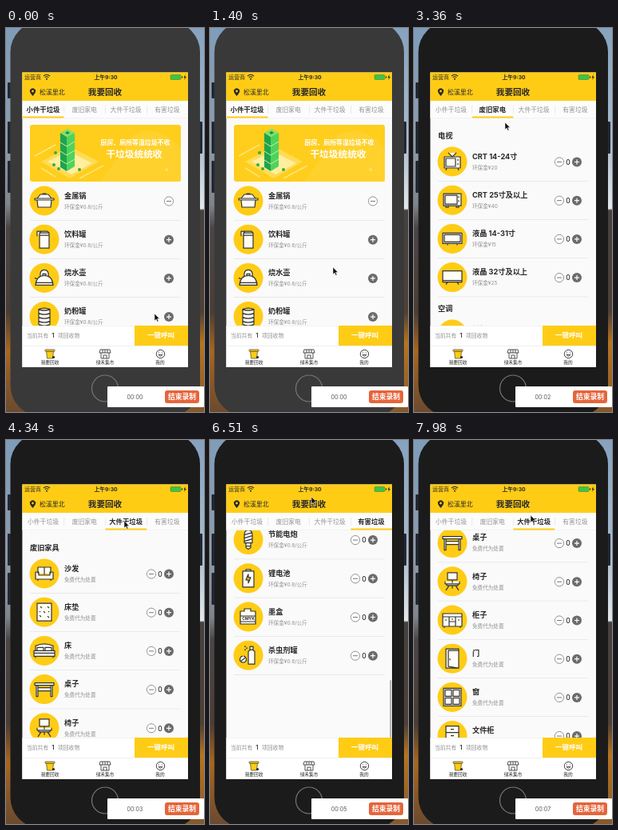
Recreate the animation shown at these times as an HTML page. Size 248 by 480 pixels, loop 8000 ms.

```html
<!DOCTYPE html>
<html lang="zh-CN">
<head>
<meta charset="utf-8">
<style>
  html, body { margin: 0; width: 100%; height: 100%; overflow: hidden; }
  svg { display: block; }
  #stage { width: 248px; height: 480px; font-family: Inter, 'Noto Sans CJK SC', 'Noto Sans CJK', sans-serif; }
  .icon { fill: #fffdf5; stroke: #333; stroke-width: 1.2; stroke-linejoin: round; }
</style>
</head>
<body>
<svg id="stage" viewBox="0 0 248 480"></svg>
<script>
const YELLOW = '#ffcc15', INK = '#292929', GREY = '#929292';
const PITCH = 48.2, LIST_TOP = 113, LIST_HEIGHT = 259;

// Text is centred vertically on y.
const text = (x, y, size, str, fill = INK, weight = 400, anchor = 'start', id = '') =>
  `<text ${id && `id="${id}"`} x="${x}" y="${y + size * .38}" font-size="${size}" fill="${fill}" font-weight="${weight}" text-anchor="${anchor}">${str}</text>`;
const rect = (x, y, w, h, fill, r = 0, more = '') =>
  `<rect x="${x}" y="${y}" width="${w}" height="${h}" rx="${r}" fill="${fill}" ${more}/>`;
const circle = (x, y, r, fill, more = '') => `<circle cx="${x}" cy="${y}" r="${r}" fill="${fill}" ${more}/>`;
const path = (d, fill = 'none', more = '') => `<path d="${d}" fill="${fill}" ${more}/>`;

const icons = {
  pot: 'M-9-1H9L8 8H-8ZM-12-3H12V-1H-12ZM-9-3L-5-8H5L9-3M-2-8V-9H2V-8',
  can: 'M-6-8H6V11H-6ZM-6-8L-4-10H4L6-8M-9-4V-10H-4M-6-5H6',
  kettle: 'M-11 9Q-10-3 0-3T11 9ZM-11 6H11M-5-2Q-6-10 0-10T5-2M-8 2L-12 0M-2-3V-5H2V-3',
  tin: 'M-7-9V10Q0 13 7 10V-9Q0-6-7-9Q0-12 7-9M-7-4Q0-1 7-4M-7 1Q0 4 7 1M-7 6Q0 9 7 6',
  tv: 'M-10-6H10V8H-10ZM-8-4H4V6H-8ZM-5-11L0-6L5-11M7-3V-1M7 2V4M-7 8L-8 11M7 8L8 11',
  bigTv: 'M-11-8H11V7H-11ZM-9-6H6V5H-9ZM8-5V-3M8 0V2M-8 7V9H-5V7M5 7V9H8V7',
  lcd: 'M-12-7H12V6H-12ZM-10-5H10V4H-10ZM-6 6V8M6 6V8',
  wideLcd: 'M-12-8H12V6H-12ZM-12 4H12M-6 6L-8 9M6 6L8 9',
  cooler: 'M-12-6H12V5H-12ZM-9 2H9M6-3H9',
  sofa: 'M-8 0V-8H8V0M0-8V1M-11-2H-7V2H7V-2H11V7H-11ZM-8 7V9M8 7V9',
  mattress: 'M-9-11H9V11H-9ZM-5-7L-3-5M4-7L6-5M-1-1L1 1M-6 4L-4 6M4 5L6 7M-6-1L-5 0M5-1L6 0',
  bed: 'M-11 0V-6Q0-11 11-6V0M-9 0V-4H-1V0M1 0V-4H9V0M-13 0H13V7H-13ZM-13 3H13M-11 7V9M11 7V9',
  desk: 'M-12-8H12V-5H-12ZM-10-5V9H-8V-5M8-5V9H10V-5M-8-2H8V2H-8Z',
  chair: 'M-6-11H6V-2H-6ZM0-2V2M-9 0V3H9V0M-7 3H7V5H-7ZM-4 5L-8 11M4 5L8 11M0 5V9',
  cabinet: 'M-12-8H12V8H-12ZM-12-4H12M-4-4V8M4-4V8M-4 2H4M-9 0H-7M-1-1H1M7 0H9M-10 8V10M10 8V10',
  door: 'M-8-12H8V12H-8ZM-5-10H8V12L-5 10ZM-3 0V2',
  window: 'M-11-11H11V11H-11ZM-9-9H-1V-1H-9ZM1-9H9V-1H1ZM-9 1H-1V9H-9ZM1 1H9V9H1Z',
  files: 'M-8-12H8V12H-8ZM-8-4H8M-8 4H8M-2-8H2M-2 0H2M-2 8H2',
  tube: 'M-10 6L6-10L10-6L-6 10ZM-7 3L-3 7M3-7L7-3',
  gauge: 'M-3-11H3V3Q6 7 0 10Q-6 7-3 3ZM0-6V6M3-6H6M3-2H6',
  pill: 'M-9 3L3-9Q10-9 9-3L-3 9Q-10 9-9 3ZM-3-3L3 3',
  bulb: 'M-5-6Q-5-12 0-12T5-6V4H-5ZM-5-6L5-9M-5-2L5-5M-5 2L5-1M-3 4V10L0 12L3 10V4M-3 8H3',
  battery: 'M-7-9H7V11H-7ZM-3-11H3V-9H-3ZM0-5L-3 2H0V6L3-1H0Z',
  ink: 'M-10-7H-5V-10H3V-7H9V9H-10ZM-10-1H9M-10 6H9',
  spray: 'M0-5Q4-9 8-5V11H0ZM2-7V-11H6V-7M-7 1A4 4 0 1 0-6 1M-9 7L-4 3M-3-9H-1M-5-11H-3M-5-7H-3'
};

const button = (x, y, plus) => plus
  ? circle(x, y, 6, '#6b6b6b') + path(`M${x - 3} ${y}h6m-3-3v6`, 'none', 'stroke="#fff" stroke-width="1.2"')
  : circle(x, y, 5.6, '#fff', 'stroke="#888" stroke-width=".9"') + path(`M${x - 3} ${y}h6`, 'none', 'stroke="#777"');

function row(y, [icon, name, note], controls) {
  return circle(48, y, 18.5, YELLOW)
    + `<g transform="translate(48 ${y})">${path(icons[icon], '#fffdf5', 'class="icon"')}`
    + (icon === 'ink' ? text(0, 2.5, 5, 'CMYK', INK, 700, 'middle') : '') + '</g>'
    + text(73, y - 6.6, 9.2, name, INK, 700) + text(73, y + 7.3, 6.6, note, GREY)
    + rect(30, y + 24, 188, .6, '#dedede') + controls(y + .5);
}
const counter = y => button(182, y, false) + text(193, y, 8.5, '0', INK, 500, 'middle') + button(204, y, true);

function section(y, title, rows) {
  return text(30, y, 9.2, title, INK, 700) + rows.map((r, i) => row(y + 32 + i * PITCH, r, counter)).join('');
}

const perKilo = '环保金¥0.8/公斤', free = '免费代为处置';
const withNote = (note, items) => items.map(item => [...item, note]);

const banner = rect(30, 121, 189, 71, '#ffcd1c', 3)
  + path('M118 192L160 134Q190 118 219 150V192Z', '#ffd53c', 'opacity=".5"')
  + path('M44 167L80 148L116 167L80 188Z', '#ffdc55') + path('M52 167L78 154L108 169L82 183Z', '#ffef9f')
  + path('M36 160L62 146M92 188L122 172M44 175L62 186', 'none', 'stroke="#ffe47a" stroke-width="1.5"')
  + path('M68 131L76 136V179L68 174Z', '#1fa34c') + path('M76 136L86 131V173L76 179Z', '#4fd35c')
  + path('M68 131L77 126L86 131L76 136Z', '#7be36d') + path('M74 131L77 129L80 131L77 133Z', '#258a42')
  + [143, 154, 165].map(y => path(`M68 ${y}l8 5l10-6`, 'none', 'stroke="#c4f0a0"')).join('')
  + [[62, 156], [60, 171], [66, 176], [92, 177]].map(([x, y]) => circle(x, y, 2, '#3aa948')).join('')
  + path('M199 175l4 4m0-4l-4 4', 'none', 'stroke="#ffe78a"')
  + text(162, 143, 7.9, '厨房、厕所等湿垃圾不收', '#fff', 700, 'middle')
  + text(160.5, 158, 11.7, '干垃圾统统收', '#fff', 700, 'middle');

const pages = [
  banner + withNote(perKilo, [['pot', '金属锅'], ['can', '饮料罐'], ['kettle', '烧水壶'], ['tin', '奶粉罐']])
    .map((r, i) => row(216 + i * PITCH, r, y => button(204, y, i > 0))).join(''),
  section(135, '电视', [['tv', 'CRT 14-24寸', '环保金¥20'], ['bigTv', 'CRT 25寸及以上', '环保金¥40'],
    ['lcd', '液晶 14-31寸', '环保金¥15'], ['wideLcd', '液晶 32寸及以上', '环保金¥25']])
    + section(351, '空调', [['cooler', '挂机', '环保金¥60']]),
  section(135, '废旧家具', withNote(free, [['sofa', '沙发'], ['mattress', '床垫'], ['bed', '床'], ['desk', '桌子'],
    ['chair', '椅子'], ['cabinet', '柜子'], ['door', '门'], ['window', '窗'], ['files', '文件柜']])),
  section(135, '有害垃圾', withNote(perKilo, [['tube', '灯管'], ['gauge', '温度计'], ['pill', '过期药品'],
    ['bulb', '节能电炮'], ['battery', '锂电池'], ['ink', '墨盒'], ['spray', '杀虫剂罐']]))
];
const tabNames = ['小件干垃圾', '废旧家电', '大件干垃圾', '有害垃圾'];
const tabCentre = i => 46.5 + i * 51.8;

const backdrop = `<defs>
  <linearGradient id="west" x2="0" y2="1">
    <stop stop-color="#7f9dba"/><stop offset=".3" stop-color="#8c9cad"/><stop offset=".46" stop-color="#80858c"/>
    <stop offset=".52" stop-color="#4a4646"/><stop offset=".74" stop-color="#4c3d34"/>
    <stop offset=".84" stop-color="#a8661f"/><stop offset="1" stop-color="#6b4a30"/>
  </linearGradient>
  <linearGradient id="east" x2="0" y2="1">
    <stop stop-color="#86a2be"/><stop offset=".3" stop-color="#a9bccd"/><stop offset=".47" stop-color="#e3e8ec"/>
    <stop offset=".475" stop-color="#45413f"/><stop offset=".74" stop-color="#4f4036"/>
    <stop offset=".82" stop-color="#b8741f"/><stop offset="1" stop-color="#85592c"/>
  </linearGradient>
</defs>` + rect(0, 0, 124, 480, 'url(#west)') + rect(124, 0, 124, 480, 'url(#east)');

const phone = [[2, 68, 20], [2, 117, 40], [2, 166, 40], [242, 117, 40]].map(([x, y, h]) => rect(x, y, 4, h, '#222833', 1)).join('')
  + rect(5.5, -8, 237.5, 493, '#1b1b1c', 38, 'id="body"')
  + circle(124, 450.5, 16.5, 'none', 'stroke="#77777a" stroke-width="1.2"');

const list = rect(20.4, 55.5, 207.6, 368.5, '#fafafa')
  + `<svg x="21" y="${LIST_TOP}" width="207" height="${LIST_HEIGHT}" viewBox="21 ${LIST_TOP} 207 ${LIST_HEIGHT}"><g id="scroller">`
  + pages.map(p => `<g class="page">${p}</g>`).join('') + '</g>'
  + rect(225.3, 0, 1.8, 72, '#aaa', 1, 'id="bar"') + '</svg>';

const header = rect(20.4, 55.5, 207.6, 35.5, YELLOW)
  + text(23, 61.5, 7, '运营商')
  + path('M47 60Q51 56.5 55 60M48.7 61.8Q51 59.8 53.3 61.8', 'none', `stroke="${INK}" stroke-width="1.1"`) + circle(51, 63.7, 1, INK)
  + text(125, 61.5, 6.8, '上午9:30', INK, 700, 'middle')
  + rect(206, 58.5, 13, 6, '#35c84b', 1.3, 'stroke="#6c7a25" stroke-width=".6"') + rect(220, 60.3, 1, 2.4, INK)
  + path('M224.5 58L222.5 62H224L223 65L226 61H224.3Z', INK)
  + path('M33.5 85Q29 80 30 77.5Q33.5 73 37 77.5Q38 80 33.5 85Z', INK) + circle(33.5, 79, 1.4, YELLOW)
  + text(42, 80, 7.9, '松溪里北') + text(124, 80, 10.6, '我要回收', INK, 700, 'middle')
  + rect(20.4, 91, 207.6, 22, '#fcfcfc') + rect(20.4, 112.5, 207.6, .5, '#e8e8e8')
  + [1, 2, 3].map(i => rect(20.7 + i * 51.8, 97, .6, 10, '#ddd')).join('')
  + rect(0, 110.5, 51.5, 2, YELLOW, 0, 'id="underline"')
  + tabNames.map((name, i) => text(tabCentre(i), 102, 7.8, name, GREY, 400, 'middle', 'tab' + i)).join('');

const footer = rect(20.4, 372, 207.6, 52, '#fff') + rect(20.4, 372, 140, .5, '#e4e4e4')
  + text(26, 384, 6.8, '当前共有', GREY) + text(59, 384, 8, '1', INK, 500, 'middle') + text(65, 384, 6.8, '项回收物', GREY)
  + rect(161, 372, 67, 25, YELLOW) + text(194, 384, 8.5, '一键呼叫', '#fff', 700, 'middle')
  + rect(20.4, 397, 207.6, .5, '#ddd')
  + path('M50.5 404H59.5L58.5 413H51.5Z', YELLOW, `stroke="${INK}" stroke-width=".6"`)
  + rect(49, 402, 12, 2.2, YELLOW, .5, `stroke="${INK}" stroke-width=".6"`) + circle(59.5, 411.5, 1.6, INK)
  + path('M118 402H130L131 406H117ZM119 406V413H129V406M122 413V409H126V413M121 402V406M124 402V406M127 402V406', 'none', `stroke="${INK}" stroke-width=".8"`)
  + circle(193.5, 407.5, 5.2, 'none', `stroke="${INK}" stroke-width=".9"`)
  + path('M191.5 405.5v1M195.5 405.5v1M191 408.5H196Q193.5 412 191 408.5', 'none', `stroke="${INK}" stroke-width=".8"`)
  + ['我要回收', '绿禾集市', '我的'].map((s, i) => text(55 + i * 69, 417.5, 5.7, s, INK, 500, 'middle')).join('');

const recorder = rect(127, 448, 121, 26, '#fff', 1)
  + text(161.5, 461, 7.1, '00:00', '#555', 400, 'middle', 'clock')
  + rect(199, 453, 43, 16, '#e5653b', 3) + text(220.5, 461, 8.8, '结束录制', '#fff', 700, 'middle');

const cursor = path('M0 0V9L2.1 7.1L3.6 10.3L5 9.7L3.6 6.5H6.3Z', '#111', 'id="cursor" stroke="#fff" stroke-width=".5"');

document.getElementById('stage').innerHTML = backdrop + phone + list + header + footer + recorder + cursor;

const $ = id => document.getElementById(id);
const pageGroups = document.querySelectorAll('.page');

// Pointer path: time, x, y
const route = [[0, 186, 357], [700, 186, 357], [1400, 154, 299], [2240, 178, 107], [2660, 102, 101], [2900, 102, 101],
  [3360, 114, 118], [3900, 148, 101], [4500, 148, 101], [5150, 200, 101], [5600, 200, 101], [6080, 127, 258],
  [6510, 127, 71], [6700, 127, 71], [7300, 146, 94], [8000, 146, 94]];
// Tab changes, latest first: time, tab
const switches = [[7500, 2], [5500, 3], [4250, 2], [2730, 1], [0, 0]];
const DRAG_START = 6080, DRAG_END = 6620;

function pointer(t) {
  const i = route.findIndex(p => p[0] > t);
  const [t0, x0, y0] = route[i - 1], [t1, x1, y1] = route[i];
  const k = (t - t0) / (t1 - t0), e = k * k * (3 - 2 * k);
  return [x0 + (x1 - x0) * e, y0 + (y1 - y0) * e];
}

function scrollAt(t, y) {
  if (t < DRAG_START) return 0;
  return t < DRAG_END ? 258 - y : 183 + 4 * Math.exp((DRAG_END - t) / 90);
}

function draw(now) {
  const t = Math.floor(now % 8000 / 70) * 70;
  const active = switches.find(s => t >= s[0])[1];
  const [x, y] = pointer(t), scroll = scrollAt(t, y);

  pageGroups.forEach((g, i) => g.setAttribute('display', i === active ? 'inline' : 'none'));
  tabNames.forEach((_, i) => {
    const on = i === active, tab = $('tab' + i);
    tab.setAttribute('fill', on ? INK : GREY);
    tab.setAttribute('font-weight', on ? 700 : 400);
    tab.setAttribute('font-size', on ? 8.4 : 7.8);
  });
  $('underline').setAttribute('x', 21 + active * 51.8);
  $('scroller').setAttribute('transform', `translate(0 ${-scroll})`);
  $('bar').setAttribute('y', LIST_TOP + scroll);
  $('bar').setAttribute('opacity', t < DRAG_START ? 0 : Math.max(0, Math.min(1, (7200 - t) / 250)));
  $('body').setAttribute('fill', active ? '#1b1b1c' : '#393939');
  $('clock').textContent = '00:0' + Math.max(0, Math.floor((t - 750) / 1000));
  $('cursor').setAttribute('transform', `translate(${x} ${y})`);
}

const start = performance.now();
function tick() {
  draw(performance.now() - start);
  requestAnimationFrame(tick);
}
tick();
</script>
</body>
</html>
```
